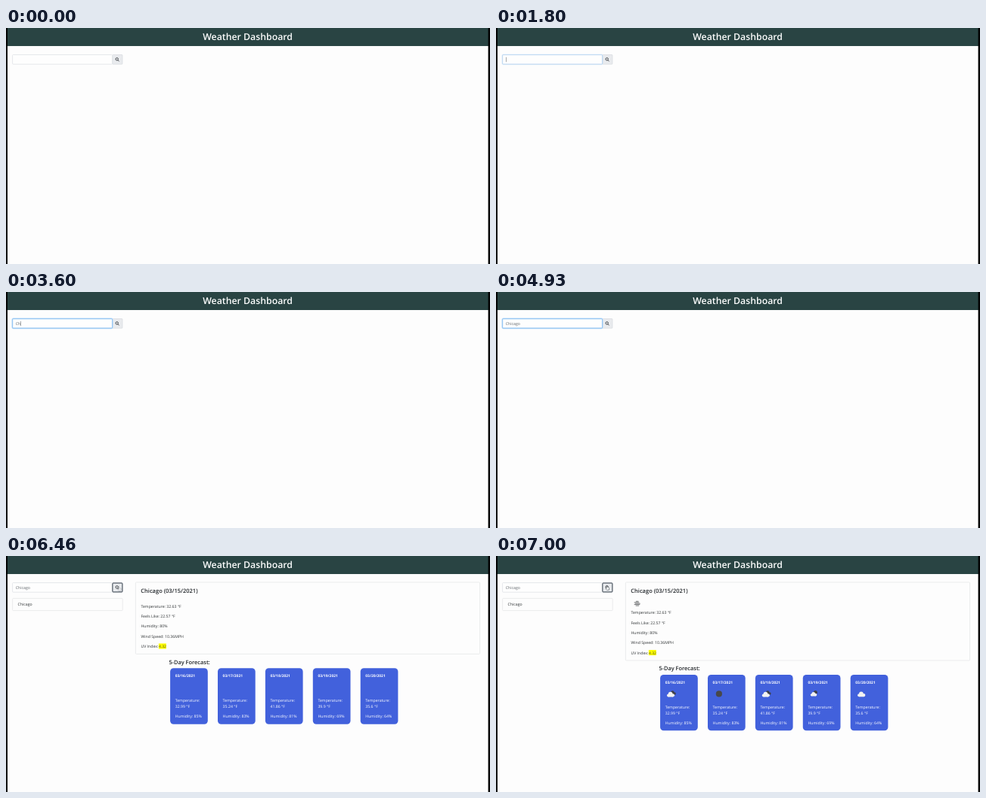
Write an HTML page with a canvas that moves like this. It is 640 by 314 pixels and loops after 8000 ms.

```html
<!DOCTYPE html>
<html lang="en">
<head>
<meta charset="utf-8">
<title>Weather Dashboard</title>
<style>
html, body { margin: 0; width: 100%; height: 100%; overflow: hidden; background: #fdfdfd; }
canvas { display: block; width: 100vw; height: 100vh; }
</style>
</head>
<body>
<canvas id="stage"></canvas>
<script>
const W = 640, H = 314, LOOP = 8000, TICK = 200 / 3;
const FONT = '"Open Sans", "Noto Sans", sans-serif';
const INK = '#303436', LINE = '#e3e4e5', WHITE = '#fbfcff';
const canvas = document.getElementById('stage');
const ctx = canvas.getContext('2d');
const ratio = window.devicePixelRatio || 1;
canvas.width = W * ratio;
canvas.height = H * ratio;
ctx.textRendering = 'geometricPrecision';

const clamp = v => Math.max(0, Math.min(1, v));
const ramp = (t, from, to) => clamp((t - from) / (to - from));
const ease = p => p * p * (3 - 2 * p);

function rect(x, y, w, h, fill) {
  ctx.fillStyle = fill;
  ctx.fillRect(x, y, w, h);
}

function frame(x, y, w, h, color, width = 0.7, radius = 1) {
  ctx.strokeStyle = color;
  ctx.lineWidth = width;
  ctx.beginPath();
  ctx.roundRect(x, y, w, h, radius);
  ctx.stroke();
}

function text(str, x, y, size = 5.2, color = INK, weight = 400, align = 'left') {
  ctx.font = `${weight} ${size}px ${FONT}`;
  ctx.textAlign = align;
  ctx.fillStyle = color;
  ctx.fillText(str, x, y);
}

function disc(x, y, r, fill) {
  ctx.fillStyle = fill;
  ctx.beginPath();
  ctx.arc(x, y, r, 0, 7);
  ctx.fill();
}

function shape(x, y, points, fill, stroke, width) {
  ctx.beginPath();
  points.forEach(([px, py]) => ctx.lineTo(x + px, y + py));
  ctx.closePath();
  ctx.fillStyle = fill;
  ctx.fill();
  ctx.strokeStyle = stroke;
  ctx.lineWidth = width;
  ctx.stroke();
}

function cloud(x, y, s, color) {
  disc(x - 3.2 * s, y + 1.5 * s, 2 * s, color);
  disc(x - 0.4 * s, y - 0.4 * s, 2.9 * s, color);
  disc(x + 2.9 * s, y + 1.3 * s, 2.2 * s, color);
  rect(x - 3.2 * s, y + 0.8 * s, 6.2 * s, 2.7 * s, color);
}

const icons = {
  broken(x, y) {
    cloud(x + 2.1, y - 1.5, 0.78, '#3f4046');
    cloud(x - 0.6, y + 0.7, 0.98, '#f2f2f2');
  },
  clear(x, y) { disc(x + 0.3, y, 4.1, '#48484a'); },
  few(x, y) {
    disc(x + 2, y - 2, 2.5, '#3f4046');
    cloud(x - 0.3, y + 0.2, 0.82, '#f2f2f2');
  },
  scattered(x, y) { cloud(x, y + 0.4, 1, '#f2f2f2'); }
};

const days = [
  ['03/16/2021', '32.99', 85, 'broken'],
  ['03/17/2021', '35.24', 83, 'clear'],
  ['03/18/2021', '41.86', 81, 'broken'],
  ['03/19/2021', '39.9', 69, 'few'],
  ['03/20/2021', '35.6', 64, 'scattered']
];

function drawMist(x, y) {
  ctx.strokeStyle = '#55575a';
  ctx.lineWidth = 0.8;
  ctx.beginPath();
  [[-1.8, 1.8, -2.9], [-4, 2.6, -1.4], [-3, 4, 0], [-4, 3.6, 1.4], [-2, 2.4, 2.9]].forEach(([a, b, dy]) => {
    ctx.moveTo(x + a, y + dy);
    ctx.lineTo(x + b, y + dy);
  });
  ctx.stroke();
}

function drawCard([date, temp, humidity, icon], i, dy, showIcon) {
  const x = 217.1 + i * 62.9, left = x + 6.6;
  ctx.fillStyle = '#4261dc';
  ctx.beginPath();
  ctx.roundRect(x, 149.3 + dy, 49.7, 74.4, 4.5);
  ctx.fill();
  text(date, left, 161.4 + dy, 4.9, WHITE, 700);
  if (showIcon) icons[icon](x + 14.6, 174.8 + dy);
  text('Temperature:', left, 194.1 + dy, 5.2, WHITE);
  text(temp + ' °F', left, 202.1 + dy, 5.2, WHITE);
  text(`Humidity: ${humidity}%`, left, 215.3 + dy, 5.2, WHITE);
}

function drawResults(t) {
  const loaded = t >= 6600, dy = loaded ? 8.6 : 0;
  frame(8.6, 56.4, 145.6, 16.2, LINE);
  text('Chicago', 15.6, 66.4);
  frame(171.4, 35, 455.2, 95.4 + dy, LINE);
  text('Chicago (03/15/2021)', 178.3, 49.4, 7.5, '#212529', 600);
  if (loaded) drawMist(186.7, 63.2);
  const lines = ['Temperature: 32.63 °F', 'Feels Like: 22.57 °F', 'Humidity: 80%', 'Wind Speed: 10.36MPH', 'UV Index: '];
  lines.forEach((s, i) => text(s, 178.4, 68.7 + i * 13.3 + dy));
  rect(201.9, 116.4 + dy, 10, 7.1, '#ffff00');
  text('4.32', 202, 121.9 + dy, 5, '#4a4a18');
  text('5-Day Forecast:', 215.4, 143.7 + dy, 7.4, '#212529', 600);
  days.forEach((day, i) => drawCard(day, i, dy, t >= 6530));
}

const keys = [3260, 3600, 3730, 3930, 4130, 4330, 4460];

function drawSearch(t) {
  const focus = ramp(t, 1720, 1930) * (1 - ramp(t, 5940, 6130));
  const pressed = ramp(t, 5940, 6130);
  rect(140.6, 35.6, 13.4, 12.6, '#e9ebee');
  frame(140.6, 35.6, 13.4, 12.6, '#d6dade');
  rect(8.6, 35.6, 132, 12.6, '#fefefe');
  frame(8.6, 35.6, 132, 12.6, '#dcdfe2');
  if (focus) {
    ctx.globalAlpha = focus;
    frame(8.3, 35.4, 132.5, 13, '#c4e0fa', 1.7, 1.5);
    frame(8.6, 35.6, 132, 12.6, '#84bdf0', 0.8);
    ctx.globalAlpha = 1;
  }
  if (pressed) {
    ctx.globalAlpha = pressed;
    frame(140.9, 36, 13, 11.9, '#36404c', 1, 0.8);
    ctx.globalAlpha = 1;
  }
  // magnifier
  ctx.strokeStyle = '#2c3136';
  ctx.lineWidth = 0.9;
  ctx.beginPath();
  ctx.arc(146.7, 41.4, 1.7, 0, 7);
  ctx.moveTo(147.9, 42.7);
  ctx.lineTo(149.6, 44.4);
  ctx.stroke();

  const typed = 'Chicago'.slice(0, keys.filter(k => t >= k).length);
  text(typed, 12.8, 44, 5.2, '#60666b');
  const caret = (t >= 1660 && t < 2200) || (t >= 2730 && t < 4930) || (t >= 5460 && t < 6000);
  if (caret) rect(13 + ctx.measureText(typed).width, 38.8, 0.5, 6.4, '#50565b');
}

const arrow = [[0, 0], [0, 5.4], [1.3, 4.2], [2.2, 6.2], [3, 5.8], [2.2, 3.9], [3.9, 3.8]];
const hand = [[1.4, 0], [2.2, 0], [2.4, 2], [4.4, 2.5], [4.9, 3.2], [4.4, 6.2], [1.8, 6.2], [0, 3.8], [0.5, 3.3], [1.3, 3.9]];

function drawPointer(t) {
  if (t >= 130 && t < 1260) {
    const p = ease(ramp(t, 330, 1200)), q = 1 - p;
    const x = q * q * 540 + 2 * p * q * 580 + p * p * 150.5;
    const y = q * q * 105 + 2 * p * q * 104 + p * p * 50.4;
    ctx.globalAlpha = ramp(t, 60, 260);
    shape(x, y, arrow, '#ffffff', '#44484c', 0.4);
    ctx.globalAlpha = 1;
  } else if (t >= 5800) {
    const p = ramp(t, 6730, 7000);
    ctx.globalAlpha = ramp(t, 5730, 5860) * (0.45 + 0.55 * p);
    shape(147.2 - 2.4 * p, 40.4 - 1.2 * p, hand, '#f6f8fa', '#2c3136', 0.45);
    ctx.globalAlpha = 1;
  }
}

function draw(now) {
  const t = Math.floor((now % LOOP + 7) / TICK) * TICK;
  ctx.setTransform(ratio, 0, 0, ratio, 0, 0);
  rect(0, 0, W, H, '#fdfdfd');
  rect(0, 0, W, 24, '#294443');
  text('Weather Dashboard', 319.6, 15.9, 12.3, '#fcfdfd', 600, 'center');
  rect(0, 0, 2, H, '#000');
  rect(637.6, 0, 2.4, H, '#000');
  drawSearch(t);
  if (t >= 6460) drawResults(t);
  drawPointer(t);
}

let start;
function loop(now) {
  start ??= now;
  draw(now - start);
  requestAnimationFrame(loop);
}
draw(0);
requestAnimationFrame(loop);
</script>
</body>
</html>
```
